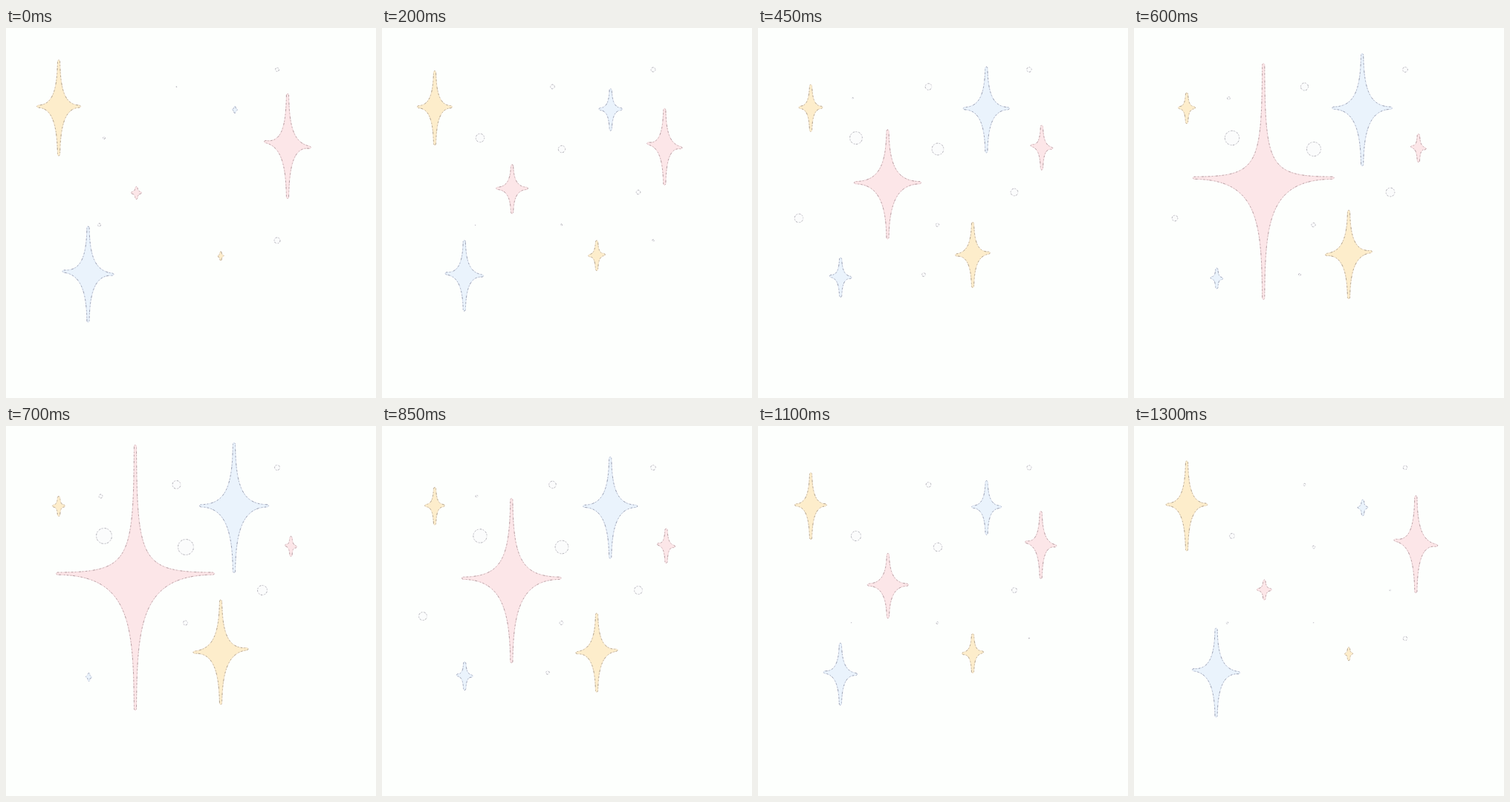
An HTML page with a canvas that plays this animation: 498x498 px, repeating every 1.35 s.

```html
<!DOCTYPE html>
<html lang="en">
<head>
<meta charset="utf-8">
<title>Twinkling stars</title>
<style>
  html, body { margin: 0; width: 100%; height: 100%; overflow: hidden; background: #fdfffd; }
  canvas { display: block; width: 498px; height: 498px; }
</style>
</head>
<body>
<canvas id="sky" width="498" height="498"></canvas>
<script>
const ctx = document.getElementById('sky').getContext('2d');
const LOOP = 1350, STEP = 50, PEAK = 700;

const tones = {
  yellow: { fill: '#fdedcb', edge: '#efdfc6', ink: '#b5a793' },
  pink:   { fill: '#fce6e8', edge: '#efd6d9', ink: '#b9a2a6' },
  blue:   { fill: '#eaf3fc', edge: '#d8e0ee', ink: '#a0a5b6' }
};

const mix = (a, b, k) => a + (b - a) * k;
const clamp = k => Math.max(0, Math.min(1, k));
const smooth = k => k * k * (3 - 2 * k);

// Size easings over the pulse, 0 at rest and 1 at its peak
const linear = p => p;
const slow = p => p ** 1.2;
const fast = p => 1 - (1 - p) ** 1.2;
const quick = p => p ** .6;
const shoot = p => .65 * p ** 1.2 + .35 * smooth(clamp((p - .7) / .17));
const flash = p => Math.sin(Math.PI * clamp((p - .385) / .615));

// Every pair runs from rest to peak
const stars = [
  { tone: 'yellow', x: [71, 71], y: [107.5, 108], w: [60, 18], h: [130, 28], ease: linear },
  { tone: 'pink', x: [379, 383.5], y: [159, 162], w: [64, 17], h: [142, 28], ease: fast, tilt: .12 },
  { tone: 'blue', x: [110.5, 111.5], y: [331.5, 338], w: [70, 9], h: [130, 12], ease: linear, tilt: .06 },
  { tone: 'blue', x: [308, 307], y: [110, 110], w: [8, 94], h: [10, 176], ease: linear },
  { tone: 'yellow', x: [289, 289], y: [307, 304.5], w: [9, 75], h: [13, 142], ease: slow, tilt: -.06 },
  { tone: 'pink', x: [175.5, 174], y: [222, 204], w: [15, 214], h: [18, 358], ease: shoot }
];

// Diameters below zero keep a dot hidden for part of the pulse
const dots = [
  { x: 365, y: 56, d: [6, 8], ease: quick },
  { x: 229.5, y: 79, d: [2, 12], ease: quick },
  { x: 132, y: 148, d: [4, 22], ease: quick },
  { x: 242, y: 163, d: [0, 22], ease: quick },
  { x: 345, y: 221, d: [0, 14], ease: quick },
  { x: 365, y: 286, d: [9, -2.5], ease: quick },
  { x: 125.5, y: 265, d: [5, -1.5], ease: quick },
  { x: 241.5, y: 265, d: [0, 7], ease: quick },
  { x: 127.5, y: 94.5, d: [-8, 6], ease: quick },
  { x: 55, y: 256, d: [0, 13], ease: flash },
  { x: 223, y: 332, d: [0, 6], ease: flash }
];

// Four-pointed star with hollow sides and blunt tips
function starPath(w, h, tilt) {
  const a = w / 2, b = h / 2;
  const r = Math.min(2.2, a * .35);
  const up = b * .97, down = b * 1.03;
  const f = .35 - .27 * Math.min(1, (b / 160) ** 2);
  const g = .35, s = a * tilt;
  const path = new Path2D();
  path.moveTo(r * .7, r - up);
  path.bezierCurveTo(r, -up * f, a * f, -r, a - r, s - r * .7);
  path.quadraticCurveTo(a + r * .6, s, a - r, s + r * .7);
  path.bezierCurveTo(a * f, r, r, down * g, r * .7, down - r);
  path.quadraticCurveTo(0, down + r * .6, -r * .7, down - r);
  path.bezierCurveTo(-r, down * g, -a * f, r, r - a, r * .7 - s);
  path.quadraticCurveTo(-a - r * .6, -s, r - a, -r * .7 - s);
  path.bezierCurveTo(-a * f, -r, -r, -up * f, -r * .7, r - up);
  path.quadraticCurveTo(0, -up - r * .6, r * .7, r - up);
  path.closePath();
  return path;
}

// Pale line with broken darker flecks on top
function paint(path, { fill, edge, ink }, dash, shift) {
  ctx.fillStyle = fill;
  ctx.fill(path);
  ctx.setLineDash([]);
  ctx.strokeStyle = edge;
  ctx.stroke(path);
  ctx.setLineDash(dash);
  ctx.lineDashOffset = shift;
  ctx.strokeStyle = ink;
  ctx.stroke(path);
}

function drawStar({ tone, x, y, w, h, ease, tilt = 0 }, p, step) {
  const n = ease(p);
  const height = mix(...h, n);
  const path = starPath(mix(...w, n), height, tilt);
  ctx.save();
  ctx.translate(mix(...x, p), mix(...y, p) - height * .015);
  paint(path, tones[tone], [2, 3, 1, 4, 3, 2, 1, 3], step * 7);
  ctx.restore();
}

const dotTone = { fill: '#fbfcfc', edge: '#ececef', ink: '#b0b0b6' };

function drawDot({ x, y, d, ease }, p, step) {
  const size = mix(...d, ease(p));
  if (size < .8) return;
  const path = new Path2D();
  path.arc(x, y, Math.max(.5, size / 2 - .5), 0, Math.PI * 2);
  paint(path, dotTone, [2, 2, 1, 3], step * 5);
}

function draw(now) {
  const step = Math.floor((now % LOOP) / STEP);
  const t = step * STEP;
  const p = t < PEAK ? t / PEAK : (LOOP - t) / (LOOP - PEAK);
  ctx.fillStyle = '#fdfffd';
  ctx.fillRect(0, 0, 498, 498);
  ctx.lineWidth = 1;
  dots.forEach(dot => drawDot(dot, p, step));
  stars.forEach(star => drawStar(star, p, step));
}

function tick() {
  draw(performance.now());
  requestAnimationFrame(tick);
}
tick();
</script>
</body>
</html>
```
